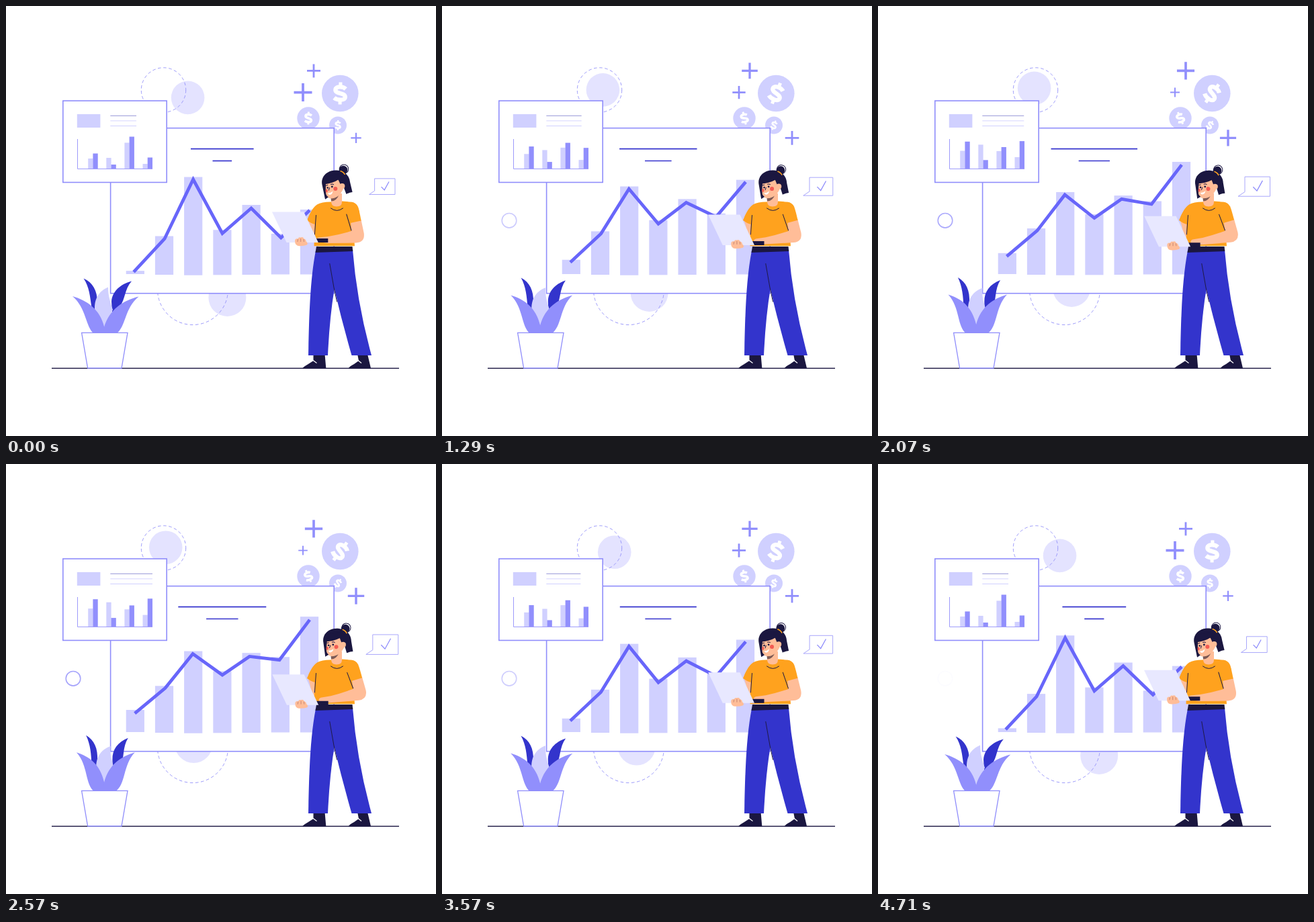
Recreate the animation shown at these times as an HTML page. Size 640 by 640 pixels, loop 4780 ms.

```html
<!DOCTYPE html>
<html lang="en">
<head>
<meta charset="utf-8">
<title>Growth chart</title>
<style>
html, body { margin: 0; width: 100%; height: 100%; overflow: hidden; background: #fff; }
svg { display: block; width: 100vw; height: 100vh; }
.line { fill: none; }
.ink { fill: none; stroke: #1f1a45; stroke-width: 1; stroke-linecap: round; stroke-linejoin: round; }
.skin { fill: #ffbd98; }
.dark { fill: #1b1740; }
.shirt { fill: #ffa21e; }
.frame { fill: #fff; stroke: #8f8dfb; stroke-width: 1.6; }
.dash { fill: none; stroke: #9c9afb; stroke-width: 1; stroke-dasharray: 4.6 3.6; }
</style>
</head>
<body>
<svg viewBox="0 0 640 640">
  <defs>
    <g id="dollar" fill="none" stroke="#fff">
      <path stroke-width="6.2" d="M8.4-6.6C4-10.8-7-11-7-5C-7 1.2 7.5-1.4 7.5 5.4C7.5 11-4 10.8-9 6.6"/>
      <path stroke-width="5" d="M.6-16.5V-9M-.2 9V16.5"/>
    </g>
  </defs>

  <circle id="discTop" r="24.8" fill="#e4e3ff"/>
  <circle id="discLow" r="28" fill="#e4e3ff"/>
  <circle class="dash" cx="234.5" cy="125" r="33.2"/>
  <circle class="dash" cx="278" cy="422" r="52.5"/>
  <circle id="ring" class="line" cx="100" cy="319.3" r="10.8" stroke="#a09efb" stroke-width="1.6"/>
  <g id="coins" fill="#d0d0ff"></g>
  <g id="pluses" class="line" stroke="#918ffc"></g>
  <g id="bubble" class="line" stroke="#a9a7fb">
    <path vector-effect="non-scaling-stroke" d="M-11.2-11.8H19.2V11.8H-19.2L-11.2 6.4Z"/>
    <path vector-effect="non-scaling-stroke" stroke="#8f8dfb" stroke-width="1.3" d="M-1.2 .4L3.4 5.2L10.2-7.2"/>
  </g>

  <rect class="frame" x="155.6" y="181.7" width="332.6" height="246"/>
  <g id="titles" stroke="#3432cd" stroke-width="1.7"></g>
  <g id="bars" fill="#d0d0ff"></g>
  <polyline id="trend" class="line" stroke="#6866fa" stroke-width="4.8"/>

  <rect class="frame" x="84.8" y="141.1" width="154.4" height="121.4"/>
  <rect x="105.8" y="161" width="34.6" height="20" fill="#d0d0ff"/>
  <g id="notes" stroke-width="1"></g>
  <g id="mini"></g>
  <path class="line" stroke="#9c9afb" d="M106.5 198V242.4H218"/>

  <path d="M68 539.2H585" stroke="#2b274f" stroke-width="1.5"/>
  <g id="leaves"></g>
  <path d="M112.6 486.4H181L172 539H121.6Z" fill="#fff" stroke="#8f8dfb" stroke-width="1.3"/>

  <g id="woman">
    <path class="dark" d="M457.5 518H474.5L476.3 539H441.5Q442.5 537 449 533.5L457.5 528Z"/>
    <path class="dark" d="M523 518H538L543 539H510Q511 536.5 518 533L525 528Z"/>
    <path class="line" stroke="#fff" stroke-width="1.2" d="M456.5 527L462.5 531.5M523.5 527L529 531.5"/>
    <path fill="#3334cc" d="M461 364C452 410 451 470 450 520H479Q481.500 465 488.700 421Q500 470 514.500 520H544Q522 440 516 363Z"/>
    <path class="ink" d="M481.800 383.500L488 419L492.500 440"/>
    <path class="dark" d="M462 358H515.500L516.300 365L460.500 367Z"/>
    <path class="skin" d="M448.500 317L462 322L460 346L454 343Q455 334 449 318Z"/>
    <path class="shirt" d="M483 291.500Q470 291.500 463 295.500C456 300 451 311 448 319Q453 323 459.500 325L458.500 357.300H519L517 330L526 308Q524 293 514 291.700L500 290.500Z"/>
    <path class="ink" d="M461.500 311.500L459.400 340"/>
    <path class="skin" d="M484.500 279H500V291.500Q500 298.500 492 298.500Q484.500 298.500 484 291.500Z"/>
    <path class="ink" d="M483.500 301Q492.500 308 501.500 301"/>
    <path fill="#7d5a55" d="M483.500 286Q491 286 495.500 281Q492 290.500 484 290.500Z"/>

    <g id="head">
      <circle class="ink" cx="503" cy="242.700" r="6.700" stroke-width=".8"/>
      <circle class="dark" cx="502" cy="244" r="6.300"/>
      <path class="dark" d="M470.500 266C468 254 478 244.500 491 244.500C505 245 511 253 512 262L515.600 277Q511 277.500 506.500 280L502 268L490 262L475 287.500Z"/>
      <path class="skin" d="M476 262L498 258L502 272Q496 286 483.500 286.500Q476 286 475.800 276Z"/>
      <path class="dark" d="M471 265.500Q486 264.500 494.500 258.500L498 266L502 263L494 250L472 255Z"/>
      <path class="dark" d="M474.800 280L479.800 284.500L475 287.800Z"/>
      <circle class="skin" cx="500.300" cy="268" r="4.100"/>
      <path class="line" stroke="#ffa21e" stroke-width="1.600" d="M497.500 245.500Q502.500 247 504.500 251"/>
      <circle cx="490.300" cy="272" r="3" fill="#f45b52"/>
      <ellipse cx="477.200" cy="275" rx="1.600" ry="2.500" fill="#f45b52"/>
      <circle class="dark" cx="478.700" cy="270.500" r="1.300"/>
      <circle class="dark" cx="485.300" cy="269" r="1.400"/>
      <path class="ink" d="M476.200 267.200L478.800 266.600M483.500 265.500Q485.500 264.500 487.500 265.700M481.500 270.500L480.400 274.200"/>
      <path fill="#fff" d="M479 278.500Q483.500 278.500 486.500 275.500Q485.500 281 481.500 281Q479.500 280.500 479 278.500Z"/>
    </g>

    <g id="arm">
      <path class="skin" d="M513 321L528.500 318L532.700 338Q534.500 352 521 352.500L478 353L463 350.500Q460 346 465 344.500L480 343Q497 340 514 335Z"/>
      <path class="shirt" d="M506 294L514 291.800Q521 292.500 524 299Q526 305 528.600 319.500L512.500 323Z"/>
      <path class="ink" d="M506.800 310L514 334"/>
    </g>
    <g id="laptop">
      <path class="dark" d="M460 346H479.300V352H462Z"/>
      <path fill="#e8e8ff" d="M396 306.500H443.300L464.800 352H417.600Z"/>
      <path class="skin" d="M430 350Q430 345.500 434.500 346.500Q435.500 343.500 438.500 344.500Q442 343 443.500 346.500Q446.500 347 446.800 350.500Q450 353 448 355.500Q444 357.300 437 357.200Q430 357 430 350Z"/>
      <path class="line" stroke="#b9786b" stroke-width=".8" d="M434.500 347L433.800 351M438.700 346V351M443 347L443.500 351"/>
    </g>
  </g>
</svg>
<script>
const LOOP = 4780;
const el = id => document.getElementById(id);
const lerp = (a, b, k) => a + (b - a) * k;
const ease = u => (1 - Math.cos(Math.PI * u)) / 2;

function add(parent, tag, attrs) {
  const node = document.createElementNS("http://www.w3.org/2000/svg", tag);
  set(node, attrs);
  el(parent).appendChild(node);
  return node;
}

function set(node, attrs) {
  for (const key in attrs) node.setAttribute(key, attrs[key]);
}

// Out to 1 at the turn time, then back to 0, eased on both legs.
const swing = (t, turn) => ease(t < turn ? t / turn : (LOOP - t) / (LOOP - turn));

// Blend two paths that share the same commands.
function blend(a, b, k) {
  const end = b.match(/-?[\d.]+/g);
  let i = 0;
  return a.replace(/-?[\d.]+/g, n => lerp(+n, +end[i++], k).toFixed(2));
}

// top, rise, bottom
const bars = [
  [394.2, -30.5, 399], [342.5, -13.2, 400], [254.5, 26, 400.7], [333.3, -27, 400.3],
  [296, -16, 400], [339, -56, 399.5], [303, -82, 399.5]
].map(([top, rise, base], i) => ({
  top, rise, base,
  node: add("bars", "rect", { x: 178.7 + i * 43.2, width: 27.2 })
}));

// x, y, and their travel
const trend = [
  [190, 396, 1.8, -27], [236, 346.5, 1, -14], [278.6, 258, -.6, 26.5], [322, 338.5, 0, -26.5],
  [365, 301, -2.8, -15.7], [409.3, 345, -2.5, -57.7], [452, 304, 0, -78]
];

const mini = [
  [227, -12], [219.5, -18.5], [226, -20.5], [236, -7],
  [203.5, 13], [194.5, 16.2], [235, -10.5], [225.5, -25.5]
].map(([top, rise], i) => ({
  top, rise,
  node: add("mini", "rect", {
    x: 122.2 + (i >> 1) * 27.1 + (i % 2) * 7.2, width: 7.3,
    fill: i % 2 ? "#918ffc" : "#d0d0ff"
  })
}));

const notes = [[163.4, "#9a99d8"], [170.9, "#d5d4ff"], [178.5, "#d0d0ff"]].map(([y, stroke]) =>
  add("notes", "line", { x1: 155.3, y1: y, y2: y, stroke }));

const titles = [[212.7, 46.8, 20.2], [230.5, 14.3, 10.2]].map(([y, half, grow]) => ({
  half, grow, node: add("titles", "line", { y1: y, y2: y })
}));

const coins = [[497.3, 130, 27.3, 1, 36], [450, 167, 16.7, .58, -26], [494, 177.5, 13, .45, 34]]
  .map(([x, y, r, size, turn]) => {
    add("coins", "circle", { cx: x, cy: y, r });
    return { x, y, size, turn, node: add("coins", "use", { href: "#dollar" }) };
  });

const pluses = [[458, 96.4, 10, 3.2], [442, 128.6, 13.5, -6.8], [521, 196.4, 7.7, 4.6]]
  .map(([x, y, half, grow]) => ({ x, y, half, grow, node: add("pluses", "path", {}) }));

const leaves = [
  ["#3334cc", "M115.5 405.5C129 411 136 424 136 441L140 462L127.500 449C125 432 124 418 115.5 405.5Z",
    "M119.4 403.7C132 411 137 424 136 441L140 462L127.500 449C127 432 126 418 119.4 403.7Z"],
  ["#3334cc", "M187 409.5C170 414 158 425 157 440L158 456L169.500 447C178 436 176 422 187 409.5Z",
    "M181.3 407.7C166 414 158 425 158.500 440L159 456L172 447C176 436 173 422 181.3 407.7Z"],
  ["#d0d0ff", "M152 418.5C138 424 129 438 133 458L146 479L159 452C155 441 152 431 152 418.5Z",
    "M156 420C141 425 132 438 135 458L146 479L161 452C157 441 155 431 156 420Z"],
  ["#918ffc", "M99 432C120 438 140 451 146.300 478L148 488H131C118 477 120 450 99 432Z",
    "M105.4 429C124 435 140 446 146.300 474L148 488H132C117 477 123 449 105.4 429Z"],
  ["#918ffc", "M197.5 432.5C175 438 154 451 146 478L144 488H164C179 477 176 450 197.5 432.5Z",
    "M191.2 429C172 435 153 446 146 474L144 488H162C179 477 173 449 191.2 429Z"]
].map(([fill, a, b]) => ({ a, b, node: add("leaves", "path", { fill }) }));

function draw(t) {
  const p = 1 - Math.abs(1 - 2 * t / LOOP);
  const c = ease(p);
  const top = swing(t, 1820), low = swing(t, 2980);

  set(el("discTop"), { cx: 270.6 - 38.7 * top, cy: 136.4 - 14.3 * top });
  set(el("discLow"), { cx: 329.4 - 52.5 * low, cy: 434 - 17.8 * low });
  set(el("ring"), { opacity: p });
  set(el("bubble"), { transform: `translate(559.800 268.700) scale(${1 + .268 * p})` });

  for (const b of bars) {
    const y = b.top + b.rise * p;
    set(b.node, { y, height: b.base - y });
  }
  set(el("trend"), {
    points: trend.map(([x, y, dx, dy]) => `${x + dx * p},${y + dy * p}`).join(" ")
  });
  for (const m of mini) {
    const y = m.top + m.rise * c;
    set(m.node, { y, height: 242.4 - y });
  }
  for (const n of notes) set(n, { x2: 194 + 24.3 * c });
  for (const l of titles) {
    const half = l.half + l.grow * p;
    set(l.node, { x1: 321.8 - half, x2: 321.8 + half });
  }
  for (const k of coins) {
    set(k.node, { transform: `translate(${k.x} ${k.y}) rotate(${k.turn * c}) scale(${k.size})` });
  }
  for (const s of pluses) {
    const h = s.half + s.grow * c;
    set(s.node, {
      d: `M${s.x - h} ${s.y}h${2 * h}M${s.x} ${s.y - h}v${2 * h}`,
      "stroke-width": h * .28
    });
  }
  for (const l of leaves) set(l.node, { d: blend(l.a, l.b, p) });

  set(el("head"), { transform: `rotate(${4.4 * p} 489 290)` });
  set(el("arm"), { transform: `rotate(${-4.5 * p} 512 298)` });
  set(el("laptop"), { transform: `translate(${.4 * p} ${7.2 * p})` });
}

function tick() {
  draw(performance.now() % LOOP);
  requestAnimationFrame(tick);
}
tick();
</script>
</body>
</html>
```
